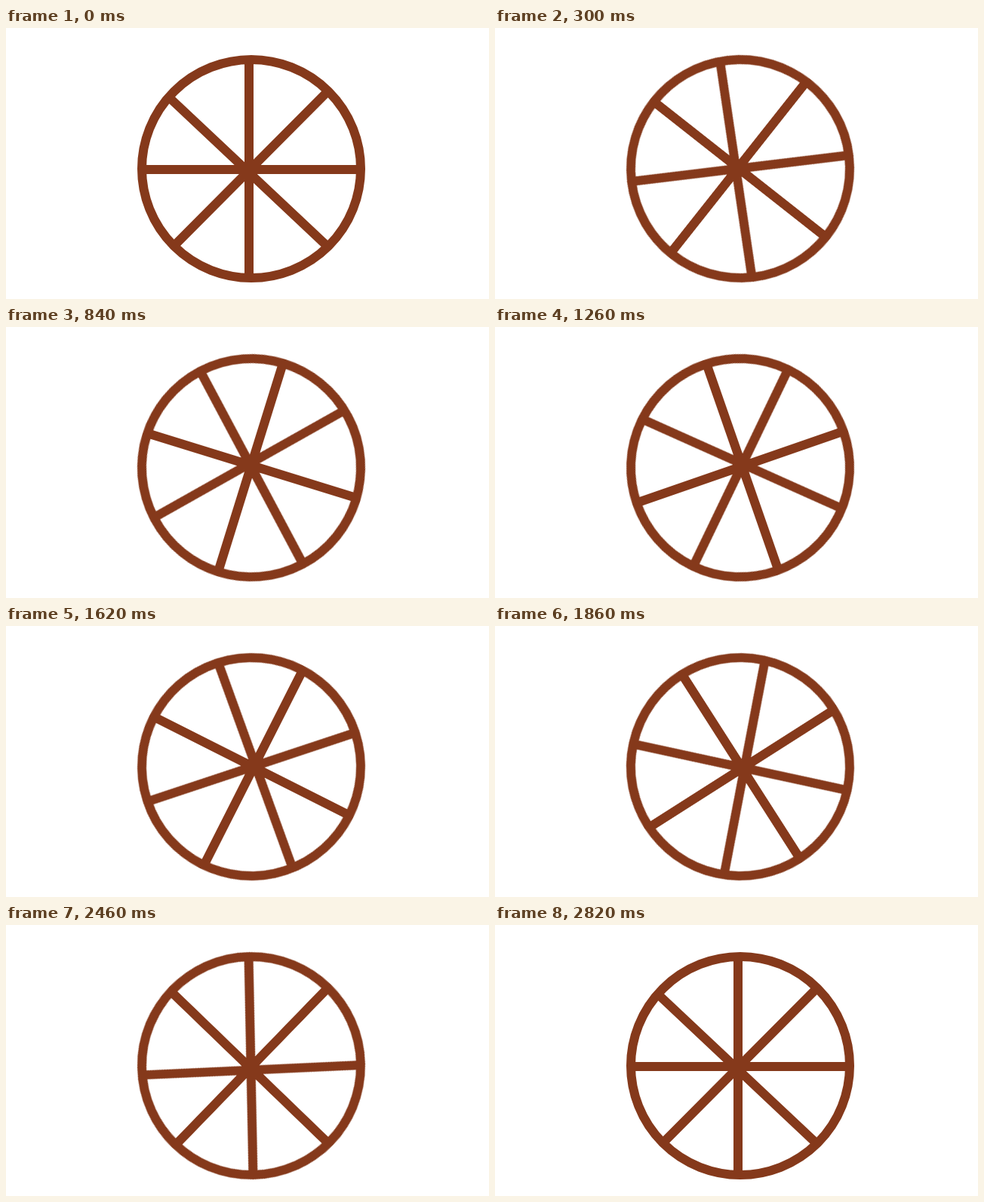
Animation, 640 px wide and 360 px high, one loop 2.88 s. Source, as an HTML page without scripts:

```html
<!DOCTYPE html>
<html lang="en">
<head>
<meta charset="utf-8">
<title>Turning wheel</title>
<style>
  html, body {
    margin: 0;
    width: 100%;
    height: 100%;
    overflow: hidden;
    background: #fff;
  }
  svg {
    display: block;
    width: 100%;
    height: 100%;
  }
  /* 48 held poses; the last one completes the turn */
  .wheel {
    fill: none;
    stroke: #85391b;
    stroke-width: 12;
    transform-origin: 325px 187px;
    animation: turn 2880ms steps(48, jump-none) infinite;
  }
  @keyframes turn {
    from { transform: rotate(0deg); }
    to { transform: rotate(360deg); }
  }
</style>
</head>
<body>
<svg viewBox="0 0 640 360">
  <g class="wheel">
    <circle cx="325" cy="187" r="145"/>
    <!-- the spokes cross slightly off the axle -->
    <path d="M180 188H470M322 42V332M217 93L426 290.2M222.5 289.5L426 84.5"/>
  </g>
</svg>
</body>
</html>
```
